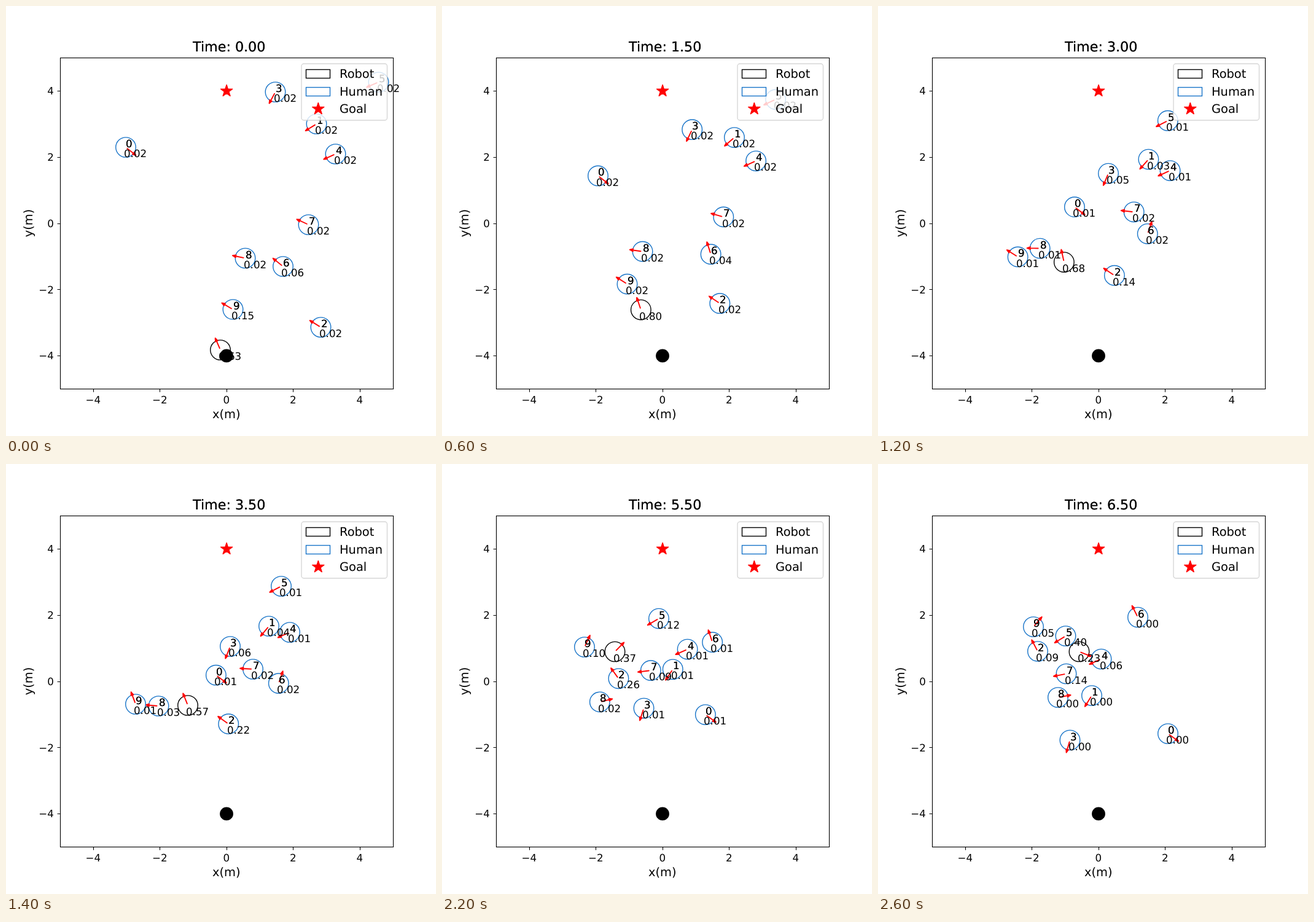
An HTML page that plays this animation: 700x700 px, repeating every 2.7 s.

```html
<!DOCTYPE html>
<html lang="en">
<head>
<meta charset="utf-8">
<title>Crowd navigation</title>
<style>
  html, body { margin: 0; width: 100%; height: 100%; overflow: hidden; background: #fff; }
  svg { display: block; width: 100%; height: 100%; }
  text {
    font-family: "DejaVu Sans", sans-serif; font-size: 16.67px; fill: #000;
    white-space: pre; text-rendering: geometricPrecision;
  }
  .mid { text-anchor: middle; }
  .end { text-anchor: end; }
  .label { font-size: 19.44px; }
  .title { font-size: 22.22px; }
  .axis { fill: none; stroke: #000; stroke-width: 1.11; }
  .ring { fill: none; stroke-width: 1.39; }
  .arrow { fill: none; stroke: #f00; stroke-width: 1.9; stroke-linecap: round; stroke-linejoin: round; }
  .star { fill: #f00; stroke: #f00; stroke-width: 1.2; stroke-linejoin: bevel; }
</style>
</head>
<body>
<svg id="stage" viewBox="0 0 700 700"></svg>
<script>
const STEP_MS = 100, STEPS = 27, DT = 0.25;
const BLUE = '#1874c8', BLACK = '#000';
const stage = document.getElementById('stage');

function make(tag, attrs, parent = stage) {
  const el = document.createElementNS('http://www.w3.org/2000/svg', tag);
  for (const k in attrs) el.setAttribute(k, attrs[k]);
  return parent.appendChild(el);
}
function write(str, x, y, cls, parent) {
  const el = make('text', { x, y, class: cls }, parent);
  el.textContent = str;
  return el;
}
// Doubled print, which darkens the edges
const writeTwice = (...args) => [write(...args), write(...args)];

function place(el, x, y) {
  el.setAttribute('x', Math.round(x));
  el.setAttribute('y', Math.round(y));
}
function star(cx, cy, parent) {
  const pts = [];
  for (let i = 0; i < 10; i++) {
    const r = i % 2 ? 3.98 : 10.42, a = i * Math.PI / 5;
    pts.push((cx + r * Math.sin(a)).toFixed(2) + ',' + (cy - r * Math.cos(a)).toFixed(2));
  }
  make('polygon', { points: pts.join(' '), class: 'star' }, parent);
}

// Layers from back to front
const [shapes, marks, axes, notes, legend] = Array.from({ length: 5 }, () => make('g', {}));

// Start and goal
make('circle', { cx: 359, cy: 569.4, r: 10.9 }, marks);
star(359.1, 138.3, marks);

// Axes
make('rect', { x: 88.5, y: 84.5, width: 542, height: 539, class: 'axis' }, axes);
for (let v = -4; v <= 4; v += 2) {
  const x = 358.75 + 54.25 * v, y = 353.5 - 53.9 * v;
  const sx = Math.round(x) + 0.5, sy = Math.round(y) + 0.5;
  const name = String(v).replace('-', '\u2212');
  make('path', { d: `M${sx} 623.5v4.9M88.5 ${sy}h-4.9`, class: 'axis' }, axes);
  write(name, x, 647, 'mid', axes);
  write(name, 77.8, Math.round(y + 6.2), 'end', axes);
}
write('x(m)', 358.75, 671, 'mid label', axes);
write('y(m)', 0, 0, 'mid label', axes).setAttribute('transform', 'translate(43 353.5) rotate(-90)');
const titles = writeTwice('', 304, 74, 'title', axes);

// Legend
make('rect', { x: 481, y: 94, width: 139.5, height: 92, rx: 3.9, fill: '#fff', stroke: '#ccc',
  'stroke-width': 1.39, 'fill-opacity': 0.8, 'stroke-opacity': 0.8 }, legend);
[BLACK, BLUE].forEach((stroke, i) =>
  make('rect', { x: 488.5, y: 103.5 + 29 * i, width: 39, height: 14, class: 'ring', stroke }, legend));
star(508.3, 167.5, legend);
['Robot', 'Human', 'Goal'].forEach((s, i) => write(s, 543, Math.round(117 + 28.6 * i), 'label', legend));

// Everyone speeds up from rest over the first few steps
const pace = step => step - 0.7 * (1 - Math.exp(-step / 1.5));

// Smooth curve through values p at times t; three points give a parabola
function curve(t, p) {
  const n = t.length - 1, h = [], c = [], m = [];
  for (let i = 0; i < n; i++) {
    h[i] = t[i + 1] - t[i];
    c[i] = (p[i + 1] - p[i]) / h[i];
  }
  for (let i = 1; i < n; i++) m[i] = (c[i - 1] * h[i] + c[i] * h[i - 1]) / (h[i - 1] + h[i]);
  m[0] = 2 * c[0] - m[1];
  m[n] = 2 * c[n - 1] - m[n - 1];

  return now => {
    let i = 0;
    while (i < n - 1 && now >= t[i + 1]) i++;
    const u = (now - t[i]) / h[i], w = 1 - u;
    return {
      pos: p[i] * (1 + 2 * u) * w * w + p[i + 1] * u * u * (3 - 2 * u)
        + h[i] * u * w * (m[i] * w - m[i + 1] * u),
      vel: 6 * u * w * c[i] + m[i] * w * (1 - 3 * u) + m[i + 1] * u * (3 * u - 2)
    };
  };
}

// way: [step, x, y] points; bumps: [height, step, width] of the attention drawn
function agent(id, way, ...bumps) {
  const t = way.map(k => pace(k[0]));
  return {
    x: curve(t, way.map(k => k[1])),
    y: curve(t, way.map(k => k[2])),
    bumps,
    ring: make('ellipse', { rx: 16.28, ry: 16.17, class: 'ring', stroke: id ? BLUE : BLACK }, shapes),
    arrow: make('path', { d: 'M3 0H21M15.6 -2L21 0L15.6 2', class: 'arrow' }, shapes),
    ids: writeTwice(id, 0, 0, '', notes),
    note: write('', 0, 0, '', notes)
  };
}

const robot = agent('', [[0, 349, 560], [9, 312, 457], [14, 296, 393], [18, 276, 358], [22, 281.5, 305.5], [26, 327.5, 305.5]]);
const humans = [
  agent('0', [[0, 195, 230], [9, 287, 302], [26, 472, 439]]),
  agent('1', [[0, 505.5, 192], [14, 428, 264], [26, 348, 377]], [0.025, 15, 4]),
  agent('2', [[0, 512.5, 523], [9, 419, 461.5], [18, 321, 389], [26, 260, 305]], [0.34, 18.5, 6.5]),
  agent('3', [[0, 438.5, 140], [14, 365, 297], [26, 312.5, 449.5]], [0.05, 14, 4]),
  agent('4', [[0, 536.5, 241], [14, 462, 274], [26, 363.5, 317.5]], [0.06, 27, 3]),
  agent('5', [[0, 606.5, 124], [9, 507.5, 169], [26, 305.5, 280]], [0.42, 27, 4.3]),
  agent('6', [[0, 451, 424], [9, 435, 389], [18, 448.5, 326], [26, 423, 249.5]], [0.04, 0, 10]),
  agent('7', [[0, 492.5, 356], [14, 402, 334], [26, 306.5, 341.5]], [0.16, 30, 10]),
  agent('8', [[0, 389.5, 410.5], [9, 295, 396], [14, 248.5, 394], [18, 242, 392], [26, 293, 380]], [0.2, 18, 2.5]),
  agent('9', [[0, 369.5, 494], [9, 266, 429.5], [14, 211, 391], [18, 218, 340], [26, 253, 265]],
    [0.13, 0, 2.5], [0.1, 23, 3.5])
];

// A fading base plus bell-shaped bumps
const attention = (a, step) => a.bumps.reduce(
  (sum, [height, at, width]) => sum + height * Math.exp(-(((step - at) / width) ** 2)),
  0.02 - 0.0006 * step);

function show(a, now, weight) {
  const x = a.x(now), y = a.y(now);
  const turn = Math.atan2(y.vel, x.vel) * 180 / Math.PI;
  a.ring.setAttribute('cx', x.pos);
  a.ring.setAttribute('cy', y.pos);
  a.arrow.setAttribute('transform', `translate(${x.pos} ${y.pos}) rotate(${turn})`);
  for (const t of a.ids) place(t, x.pos, y.pos);
  place(a.note, x.pos - 2.7, y.pos + 16.2);
  a.note.textContent = weight.toFixed(2);
}

function draw(step) {
  const now = pace(step);
  let rest = 1;
  for (const t of titles) t.textContent = 'Time: ' + (step * DT).toFixed(2);
  for (const a of humans) {
    const weight = attention(a, step);
    rest -= weight;
    show(a, now, weight);
  }
  show(robot, now, rest);
}

let shown = -1;
const start = performance.now();
function tick() {
  const step = Math.floor((performance.now() - start) / STEP_MS) % STEPS;
  if (step !== shown) draw(shown = step);
  requestAnimationFrame(tick);
}
tick();
</script>
</body>
</html>
```
